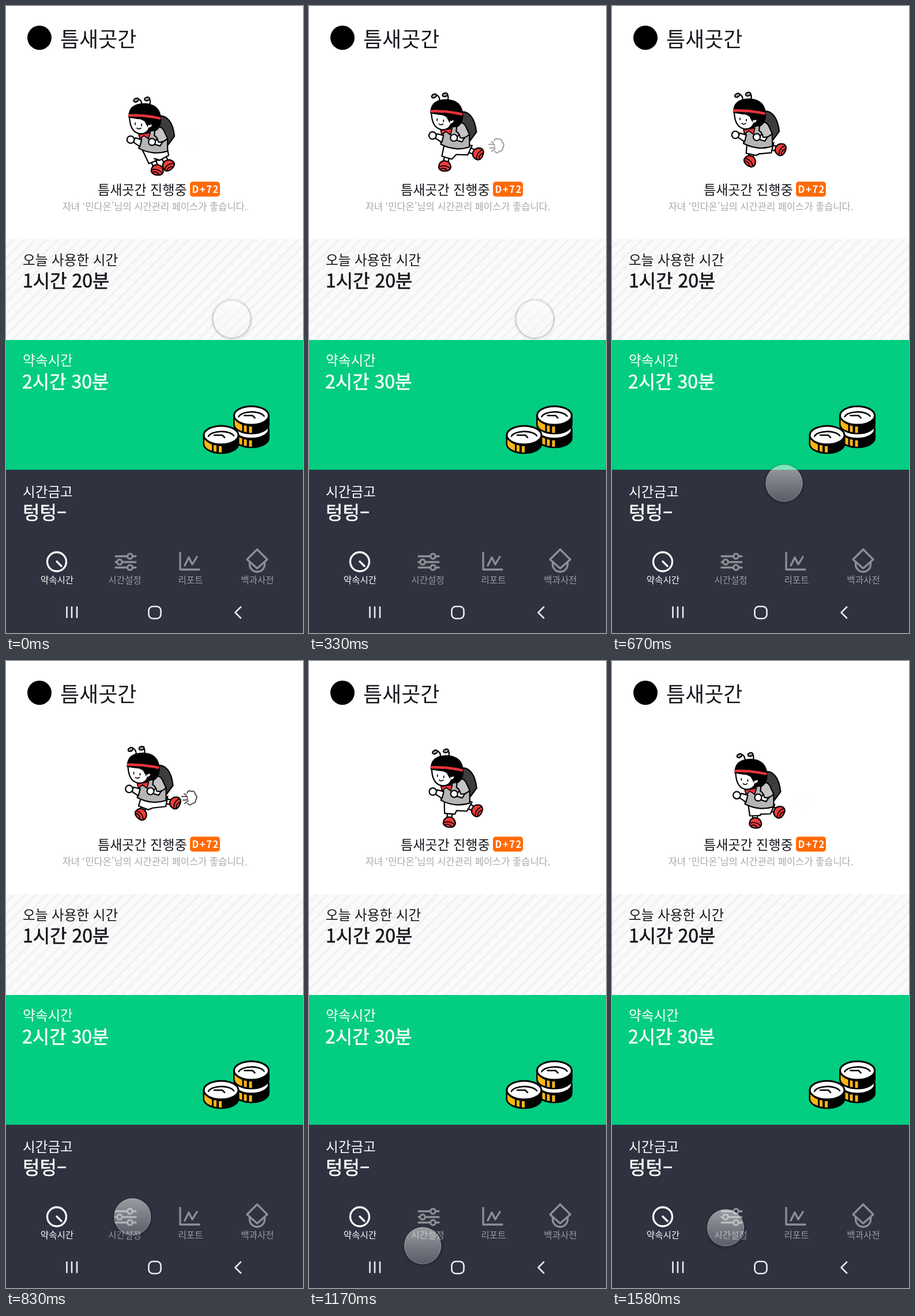
An HTML page that plays this animation: 515x1087 px, repeating every 1670 ms.

```html
<!DOCTYPE html>
<html lang="ko">
<head>
<meta charset="utf-8">
<title>하루 약속</title>
<style>
html, body { margin: 0; width: 100%; height: 100%; overflow: hidden; background: #fff; }
svg { display: block; width: 100vw; height: 100vh; }
text { font-family: "Noto Sans CJK KR", "Noto Sans CJK", sans-serif; fill: #15151c; }
.label { font-size: 23.6px; font-weight: 300; }
.value { font-size: 32px; font-weight: 500; stroke: #15151c; stroke-width: .6px; }
.light text { fill: #fff; }
.light .value { stroke: #fff; }
.tabs { font-size: 15.6px; font-weight: 300; text-anchor: middle; }
.light .tabs .off { fill: #9b9ca1; }
.line { fill: none; stroke-linecap: round; stroke-linejoin: round; }
.ink { stroke: #000; stroke-width: 2.2; stroke-linejoin: round; stroke-linecap: round; }
.fine { stroke-width: 1.7; }
.none { fill: none; }
</style>
</head>
<body>
<svg viewBox="0 0 515 1087" preserveAspectRatio="none">
  <defs>
    <pattern id="stripes" width="13.4" height="13.4" patternUnits="userSpaceOnUse" patternTransform="rotate(45)">
      <rect width="13.4" height="13.4" fill="#fafafa"/>
      <rect width="2.6" height="13.4" fill="#efefef"/>
    </pattern>
    <linearGradient id="glass" x2="0" y2="1">
      <stop stop-color="#fff" stop-opacity=".52"/>
      <stop offset="1" stop-color="#f2f2f4" stop-opacity=".22"/>
    </linearGradient>
    <radialGradient id="shade">
      <stop offset=".86" stop-opacity="0"/>
      <stop offset=".88" stop-opacity=".2"/>
      <stop offset="1" stop-opacity="0"/>
    </radialGradient>
    <g id="coin">
      <path d="M-30 0V15A30 16 0 0 0 30 15V0Z" stroke="#000" stroke-width="3"/>
      <path d="M-29 5Q-25 13-16 16V27Q-27 24-29 16ZM-13 17l5 1V29l-5-1ZM-4 19h5V30h-5Z" fill="#fdb515"/>
      <ellipse rx="30" ry="16" fill="#fff" stroke="#000" stroke-width="3"/>
      <path class="line" d="M-22 2A23 11 0 0 1 22 1M-12 0H2L6 4" stroke="#000" stroke-width="2.6"/>
    </g>
    <g id="shoe">
      <path class="ink" d="M-10 3Q-10-8 0-9Q10-8 11 2Q10 9 1 9Q-8 9-10 3Z" fill="#f03a3a"/>
      <path class="ink fine none" d="M-8 1Q0-3 9 4M-7 5Q-1 2 5 8"/>
    </g>
  </defs>

  <rect width="515" height="1087" fill="#fff"/>
  <circle cx="58" cy="55" r="21"/>
  <text x="94" y="70.5" font-size="36">틈새곳간</text>

  <path id="dust" class="line" stroke="#222" stroke-width="2" d="M-4-8Q-2-14 3-11Q9-13 10-6Q15-2 11 4Q11 10 5 10Q1 15-3 10M-13-2Q-7-3-3-1M-11 4Q-6 5-3 2M-8 10L-2 5M-9-7L-5-4"/>

  <path id="pack" class="ink" d="M260 190Q273 184 283 196Q290 205 292 223L281 238L262 240Z" fill="#3d3d3d"/>
  <g class="line" stroke="#000" stroke-width="10.5"><path id="legR"/><path id="legF"/></g>
  <g class="line" stroke="#fff" stroke-width="6"><use href="#legR" stroke="#fff"/><use href="#legF"/></g>
  <use id="shoeR" href="#shoe"/>
  <path id="shorts" class="ink" fill="#fff"/>
  <use id="shoeF" href="#shoe"/>
  <g id="body">
    <path class="ink" d="M236 219L264 210L280 228L280 249Q255 257 230 244Z" fill="#b5b5b5"/>
    <path class="ink" d="M220 233L232 241L235 229L224 226Z" fill="#fff"/>
    <circle class="ink" cx="216" cy="229" r="6.3" fill="#fff"/>
    <path class="ink" d="M254 236L267 240L274 229L262 228Z" fill="#fff"/>
    <path class="ink" d="M258 213Q266 202 273 212L280 227Q272 235 264 233Q262 224 257 222Z" fill="#c4c4c4"/>
    <circle class="ink" cx="253" cy="233" r="6" fill="#fff"/>
    <path class="ink fine" d="M230 220L250 217L247 228L239 222L232 228Z" fill="#ee3439"/>
    <g id="feelers" class="ink">
      <path class="none" d="M228 170Q229 160 221 158M242 169Q245 159 239 156"/>
      <ellipse cx="218.5" cy="160.5" rx="4.5" ry="3" fill="#999" transform="rotate(-28 218.5 160.5)"/>
      <ellipse cx="237.5" cy="158.5" rx="4.5" ry="3" fill="#999" transform="rotate(-15 237.5 158.5)"/>
    </g>
    <path class="ink" d="M213 190Q213 167 240 167Q266 168 268 192Q269 208 258 214Q252 211 246 216Z"/>
    <path class="ink" d="M214 190Q228 193 242 193Q243 201 248 203Q252 200 254 204Q252 209 248 209Q245 219 233 219Q215 217 214 190Z" fill="#fff"/>
    <path d="M222 190L247 190L246 208L240 197L234 194Z"/>
    <path class="line" d="M214 187Q240 186 266 192" stroke="#e8343b" stroke-width="4.5"/>
    <path class="ink fine none" d="M224 200v3M235 202v3M227 209Q230 212 234 209"/>
  </g>

  <text x="159" y="326.5" font-size="23">틈새곳간 진행중</text>
  <rect x="319" y="304.5" width="52" height="26" rx="5" fill="#ff6b08"/>
  <g class="light"><text x="322.5" y="324" font-size="16.5" font-weight="700" letter-spacing="1.6">D+72</text></g>
  <text x="258" y="353.5" font-size="16.5" font-weight="300" text-anchor="middle" style="fill:#a8a8a8">자녀 ‘민다온’님의 시간관리 페이스가 좋습니다.</text>

  <rect y="404" width="515" height="175" fill="url(#stripes)"/>
  <text class="label" x="29" y="448.5">오늘 사용한 시간</text>
  <text class="value" x="29" y="488">1시간 20분</text>

  <rect y="579" width="515" height="225" fill="#02cd80"/>
  <rect y="804" width="515" height="283" fill="#2f323f"/>
  <use href="#coin" x="425.5" y="734"/>
  <use href="#coin" x="425.5" y="710"/>
  <use href="#coin" x="373" y="744"/>

  <g class="light">
    <text class="label" x="29" y="623">약속시간</text>
    <text class="value" x="28" y="663">2시간 30분</text>
    <text class="label" x="29" y="850.5">시간금고</text>
    <text class="value" x="29" y="890">텅텅–</text>
    <g class="tabs">
      <text x="88.5" y="1001">약속시간</text>
      <text class="off" x="206" y="1001">시간설정</text>
      <text class="off" x="320" y="1001">리포트</text>
      <text class="off" x="436" y="1001">백과사전</text>
    </g>
  </g>

  <g class="line" stroke="#fff" stroke-width="3.3">
    <circle cx="88" cy="963.5" r="16.5"/>
    <path d="M88 963L96 971"/>
  </g>
  <g class="line" stroke="#8f9096" stroke-width="3.3">
    <path d="M190 954H210M220 954H225M190 964H192M202 964H225M190 973.5H210M220 973.5H225"/>
    <circle cx="215" cy="954" r="4.3"/><circle cx="197" cy="964" r="4.3"/><circle cx="215" cy="973.5" r="4.3"/>
    <path d="M302 948V977H335M310 970L317 956L323 968L331 955"/>
    <path d="M435.5 942L453 959.5L435.5 975L418 959.5ZM422.5 964V968A13 13 0 0 0 448.5 968V964"/>
  </g>
  <g class="line" stroke="#ececf0" stroke-width="2.6">
    <path d="M105.5 1042V1060M114 1042V1060M123 1042V1060M407 1042L397.5 1051.5L407 1061"/>
    <rect x="247.5" y="1041" width="21" height="21" rx="7"/>
  </g>

  <g id="touch">
    <circle cy="1.5" r="36.5" fill="url(#shade)"/>
    <circle r="32" fill="url(#glass)"/>
    <circle r="31.5" fill="none" stroke="#fff" stroke-opacity=".25"/>
  </g>
</svg>

<script>
const LOOP = 1670, STRIDE = 13, HALF = STRIDE / 2;
const el = id => document.getElementById(id);

// Smooth rise from 0 to 1 between two steps.
function ramp(step, from, to) {
  const p = Math.min(1, Math.max(0, (step - from) / (to - from)));
  return p * p * (3 - 2 * p);
}

function move(id, x, y, angle = 0) {
  el(id).setAttribute('transform', `translate(${x} ${y}) rotate(${angle})`);
}

// Draws the shin and returns the two corners of the trouser hem.
function leg(id, hipX, hipY, footX, footY, reach) {
  const dx = footX - hipX, dy = footY - hipY, half = 9 / Math.hypot(dx, dy);
  const x = hipX + dx * reach, y = hipY + dy * reach;
  el(id).setAttribute('d', `M${x} ${y}L${footX} ${footY}`);
  return [[x - dy * half, y + dx * half], [x + dy * half, y - dx * half]];
}

function drawRunner(phase) {
  const leaping = phase >= HALF;
  const bob = Math.cos((phase + .6) / HALF * 2 * Math.PI);
  const x = 1.7 * bob - 1.3, y = 6.5 * bob - 2.8;
  // The feet pass each other once per half stride; the rear one kicks out faster.
  const spread = Math.sqrt(Math.sin(phase % HALF / HALF * Math.PI));
  const kick = Math.sqrt(spread);
  const fx = 262 - 28 * spread, fy = 284 - (leaping ? 19 : 7) * spread;
  const rx = 281 + 12 * kick, ry = 276 - (leaping ? 30 : 20) * kick;

  move('pack', x, y);
  move('body', x, y);
  move('feelers', 7 * (1 - kick), 0);
  move('shoeF', fx, fy, 8 + (leaping ? 34 : -10) * spread);
  move('shoeR', rx, ry, -42 - 28 * kick);
  const front = leg('legF', 247 + x, 246 + y, fx, fy, .6);
  const rear = leg('legR', 267 + x, 248 + y, rx, ry, .5);
  const outline = [[236 + x, 246 + y], ...front, [257 + x, 262 + y], ...rear, [280 + x, 246 + y]];
  el('shorts').setAttribute('d', 'M' + outline.join('L') + 'Z');
}

// One puff per half stride, drifting back while it fades.
function drawDust(phase) {
  const low = phase >= 3 && phase < 10;
  const age = (phase - (low ? 3 : 10) + STRIDE) % STRIDE;
  move('dust', (low ? 324 : 318) + age, low ? 242 : 237);
  el('dust').setAttribute('opacity', .8 * Math.max(0, 1 - age / 3.3) ** 1.6);
}

function drawTouch(step) {
  move('touch',
    391.5 - 186 * ramp(step, 5, 11) - 13 * ramp(step, 11, 16) + 4.5 * ramp(step, 16, 19),
    541.5 + 418 * ramp(step, 5, 9.8) + 54 * ramp(step, 9.5, 12.5) - 31 * ramp(step, 16, 19));
}

const start = performance.now();
function tick() {
  const t = (performance.now() - start) % LOOP;
  // Twelve pictures a second, on a 10 ms grid.
  const step = Math.floor((Math.floor(t / 10) + .5) * .12);
  drawRunner(step % STRIDE);
  drawDust(step % STRIDE);
  drawTouch(step);
  requestAnimationFrame(tick);
}
tick();
</script>
</body>
</html>
```
